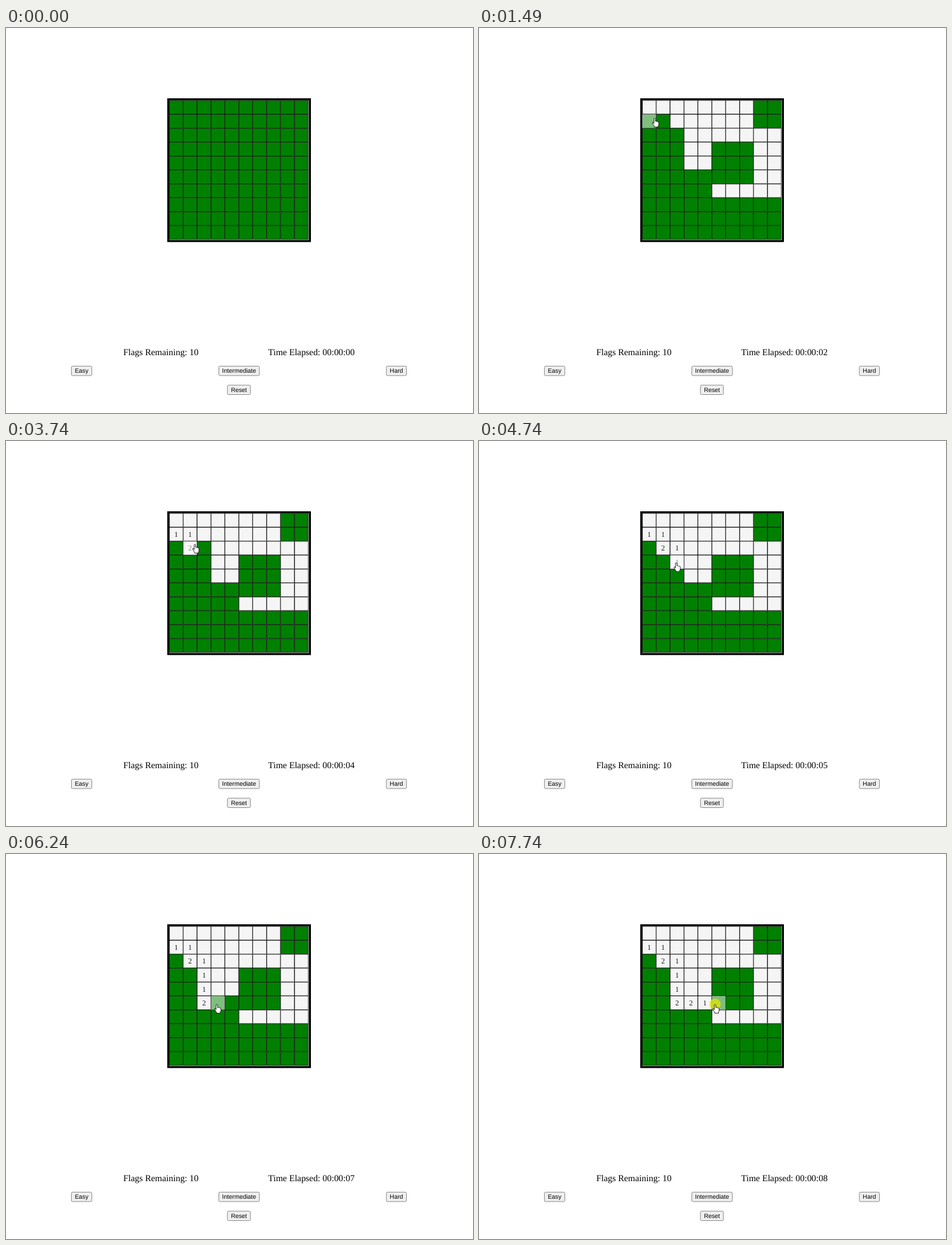
Write an HTML page that moves like this. It is 824x679 px and loops after 7990 ms.

```html
<!DOCTYPE html>
<html lang="en">
<head>
<meta charset="utf-8">
<title>Minesweeper</title>
<style>
html, body { margin: 0; width: 100%; height: 100%; overflow: hidden; background: #fff; }
svg { display: block; }
text { text-rendering: geometricPrecision; }
.serif { font-family: "Liberation Serif", "Times New Roman", serif; }
.btn { font: 10.8px "Liberation Sans", Arial, sans-serif; text-anchor: middle; }
.btn rect { fill: #efefef; stroke: #767676; stroke-width: .9; }
.num { font-size: 13px; text-anchor: middle; fill: #1c1c1c; }
.cell rect { stroke: #000; stroke-width: .7; }
</style>
</head>
<body>
<svg width="824" height="679" viewBox="0 0 824 679">
  <rect x="284.5" y="124" width="253.5" height="253.5"/>
  <rect x="288" y="127.5" width="246.2" height="246.2" fill="#fff"/>
  <path d="M288 373.9H534.4V127.5" fill="none" stroke="#777" stroke-width=".8"/>
  <g id="board"></g>
  <g class="serif" font-size="15.95">
    <text x="206.9" y="576.8">Flags Remaining: 10</text>
    <text id="clock" x="462.6" y="576.8"></text>
  </g>
  <g id="buttons"></g>
  <g id="pointer">
    <circle id="click" r="10" fill="#e4e400" fill-opacity=".75"/>
    <path fill="#fff" stroke="#000" stroke-width=".9" stroke-linejoin="round"
      d="M-1.3 9.5V1.6Q-1.3 .2 0 .2T1.3 1.6V5.6Q2.4 4.7 3.4 6Q4.7 5.2 5.4 6.6Q7.2 6.2 7.2 8V11.2Q7.2 13 6 14V15.8H-.6V14.2Q-2.6 11.6-3.8 9.2Q-4.4 7.6-3.2 7.4Q-2.2 7.6-1.3 9.5Z"/>
  </g>
</svg>
<script>
const LOOP = 7990, STEP = 250, COUNT = 10, SIZE = 24.55, LEFT = 288, TOP = 127.5;
const byId = id => document.getElementById(id);
const colAt = x => Math.floor((x - LEFT) / SIZE);
const rowAt = y => Math.floor((y - TOP) / SIZE);

function add(parent, tag, attrs, text) {
  const el = document.createElementNS("http://www.w3.org/2000/svg", tag);
  for (const name in attrs) el.setAttribute(name, attrs[name]);
  if (text) el.textContent = text;
  return parent.appendChild(el);
}

const show = (el, on) => el.setAttribute("visibility", on ? "visible" : "hidden");

// pointer stops; one with a label is a click that opens the cell below it
const stops = [
  { at: 1, x: 408, y: 207, label: "" },
  { at: 3, x: 412.5, y: 269 },
  { at: 6, x: 310, y: 159 },
  { at: 7, x: 310, y: 160, label: "1" },
  { at: 11, x: 320, y: 166, label: "1" },
  { at: 12, x: 318, y: 178 },
  { at: 13, x: 318, y: 178, label: "2" },
  { at: 16, x: 341, y: 184, label: "1" },
  { at: 18, x: 348, y: 214.5, label: "1" },
  { at: 19, x: 348, y: 214.5 },
  { at: 21, x: 349, y: 240, label: "1" },
  { at: 24, x: 350, y: 262, label: "2" },
  { at: 25, x: 372, y: 265 },
  { at: 26, x: 372, y: 265, label: "2" },
  { at: 28, x: 394, y: 265, label: "1" },
  { at: 30, x: 416.5, y: 265 },
  { at: 31, x: 416.5, y: 265, label: "" }
];

// blocks that the first click leaves covered: column, row, width, height
const covered = [
  [8, 0, 2, 2], [0, 1, 2, 9], [2, 2, 1, 8], [5, 3, 3, 3], [3, 5, 2, 5], [5, 7, 5, 3]
];
const isCovered = (col, row) => covered.some(([x, y, w, h]) =>
  col >= x && col < x + w && row >= y && row < y + h);

function makeCell(col, row) {
  const x = LEFT + col * SIZE, y = TOP + row * SIZE;
  const group = add(byId("board"), "g", { class: "cell" });
  const box = add(group, "rect", { x: x + .35, y: y + .35, width: SIZE - .7, height: SIZE - .7 });
  const hit = stops.find(s => s.label && colAt(s.x) === col && rowAt(s.y) === row);
  const label = add(group, "text", { class: "serif num", x: x + SIZE / 2, y: y + 16.8 }, hit?.label);
  const opens = hit ? hit.at : isCovered(col, row) ? Infinity : 1;
  return { col, row, group, box, label, opens };
}
const cells = Array.from({ length: COUNT * COUNT }, (_, i) =>
  makeCell(i % COUNT, Math.floor(i / COUNT)));

function button(x, y, width, text) {
  const g = add(byId("buttons"), "g", { class: "btn" });
  add(g, "rect", { x: x - width / 2, y, width, height: 16.6, rx: 2 });
  add(g, "text", { x, y: y + 11.7 }, text);
}
button(133.4, 596.4, 36, "Easy");
button(411.3, 596.4, 71.6, "Intermediate");
button(688.8, 596.4, 35.4, "Hard");
button(411, 629.9, 40.6, "Reset");

function pointerAt(step) {
  const next = stops.findIndex(s => s.at >= step);
  const b = stops[next], a = stops[next - 1] || b;
  const k = a === b ? 1 : (step - a.at) / (b.at - a.at);
  return { x: a.x + (b.x - a.x) * k, y: a.y + (b.y - a.y) * k };
}

function draw(t) {
  const step = t < STEP ? 0 : Math.min(31, Math.floor((t + 10) / STEP));
  const tip = pointerAt(step);
  const col = colAt(tip.x), row = rowAt(tip.y);

  for (const c of cells) {
    const open = step >= c.opens;
    const hover = step > 0 && c.col === col && c.row === row;
    c.box.setAttribute("fill", open ? "#f5f5f5" : "#008000");
    c.group.setAttribute("opacity", hover ? .5 : 1);
    show(c.label, open);
  }

  byId("clock").textContent = "Time Elapsed: 00:00:0" + Math.floor((step + 3) / 4);
  byId("pointer").setAttribute("transform", `translate(${tip.x} ${tip.y})`);
  byId("pointer").setAttribute("display", step ? "inline" : "none");
  show(byId("click"), stops.some(s => s.at === step && s.label !== undefined));
}

const start = performance.now();
function tick() {
  draw((performance.now() - start) % LOOP);
  requestAnimationFrame(tick);
}
draw(0);
requestAnimationFrame(tick);
</script>
</body>
</html>
```
